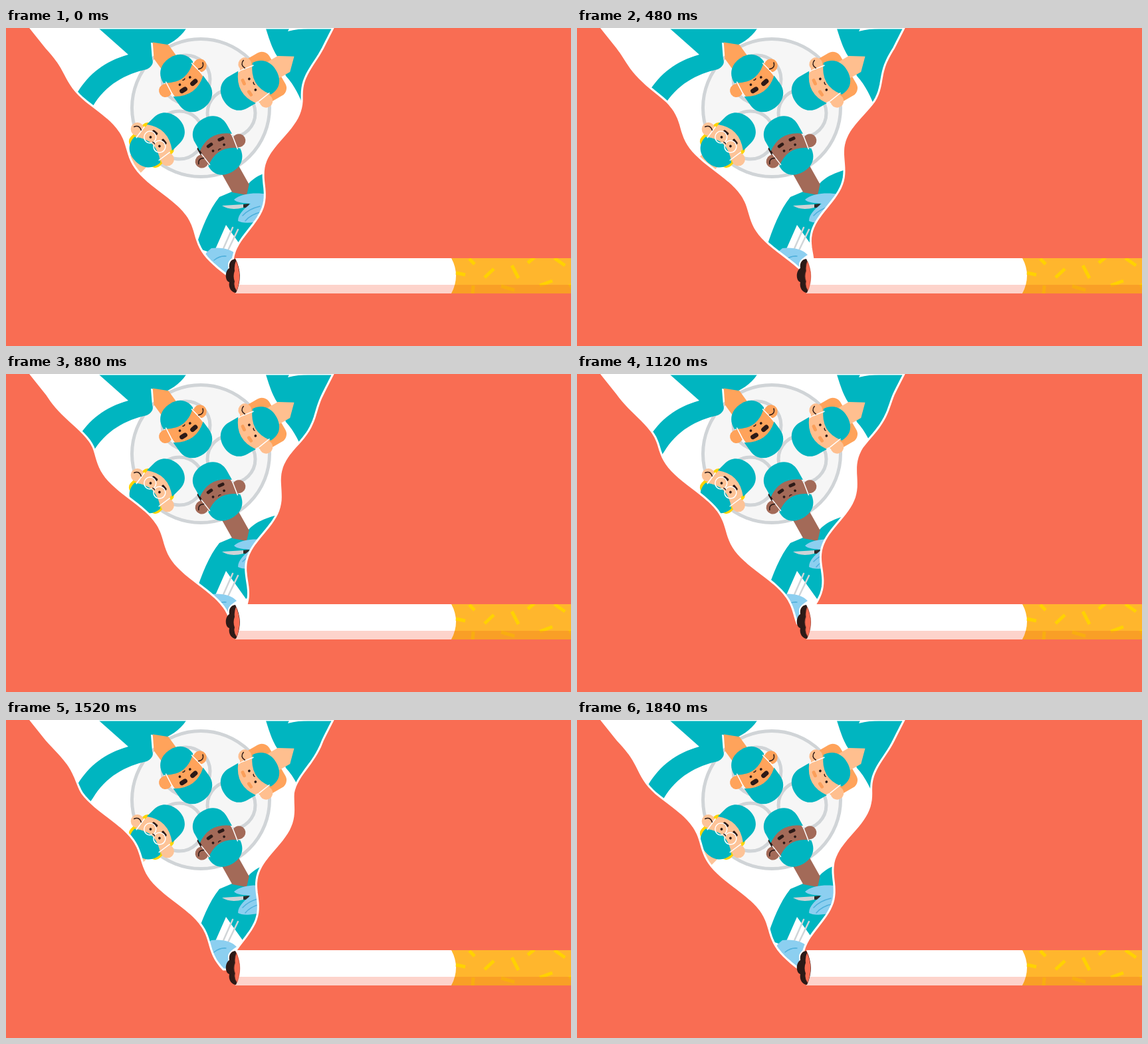
These frames come from a looping animation (850x478 px, 1.92 s). An HTML page:

```html
<!DOCTYPE html>
<html lang="en">
<head>
<meta charset="utf-8">
<title>Smoke and surgeons</title>
<style>
  html, body { margin: 0; width: 100%; height: 100%; overflow: hidden; background: #f96d53; }
  svg { display: block; width: 100%; height: 100%; }
  .teal { fill: #00b5c0; }
  .glove { fill: #8ccff0; }
  .line { fill: none; stroke-linecap: round; }
  .ember { animation: smoulder 480ms steps(3) infinite alternate; }
  @keyframes smoulder { to { transform: translateX(1px); } }
</style>
</head>
<body>
<svg viewBox="0 0 850 478">
  <defs>
    <clipPath id="smokeClip"><path class="smoke"/></clipPath>
    <clipPath id="cigClip"><path d="M345 346H850V399H345Q358 372 345 346Z"/></clipPath>
  </defs>
  <rect width="850" height="478" fill="#f96d53"/>

  <path class="smoke" fill="#fff"/>
  <g clip-path="url(#smokeClip)">
    <g fill="#f6f6f6" stroke="#d0d4d7" stroke-width="5">
      <circle cx="293" cy="120" r="103.5"/>
      <circle cx="271" cy="77" r="36"/>
      <circle cx="339" cy="128" r="36"/>
      <circle cx="261" cy="161" r="36"/>
    </g>
    <g class="teal">
      <path d="M140 1H271C263 13 253 20 241 26L218 22L220 47C223 53 218 59 212 62C180 69 150 85 131 117L115 140L90 120L108 96C125 69 148 50 184 40Z"/>
      <path d="M391 1H426L424 5Q440 1 455 1H500L480 120H448C443 105 434 86 421 72L412 48C402 36 397 20 391 1Z"/>
      <path d="M340 246L321 254C305 274 295 300 285 330L312 339L331 296L361 338L425 300V208C395 214 375 222 365 234Z"/>
    </g>
    <g id="heads"></g>

    <path d="M341 300L325 336M349 303L333 336" class="line" stroke="#d0d5d8" stroke-width="2.5"/>
    <path d="M325 267L358 265L357 270Q337 275 325 267Z" fill="#cfd3d6"/>
    <path d="M357 265L366 264L364 270L357 270Z" fill="#2d2a2a"/>
    <path class="glove" d="M343 258C355 248 375 247 395 250L398 286C375 294 355 294 349 290C349 280 358 272 368 264C358 263 348 263 343 258Z"/>
    <path class="glove" d="M309 331C325 329 340 333 347 341C338 347 334 350 334 356L336 386L294 350L302 337Z"/>
    <path class="line" stroke="#4fb0dc" stroke-width="1.5" d="M356 282Q365 272 382 268M360 290Q368 280 386 276M313 349Q322 342 331 343"/>
  </g>
  <path class="smoke" fill="none" stroke="#fff" stroke-width="3"/>

  <g clip-path="url(#cigClip)">
    <rect x="330" y="346" width="520" height="53" fill="#fff"/>
    <rect x="330" y="386" width="520" height="13" fill="#fdd3cb"/>
    <path d="M670 346H850V399H670Q684 372 670 346Z" fill="#ffb62d"/>
    <path fill="none" stroke="#ffd200" stroke-width="5" d="M697 347L705 355M677 368L691 371M720 375L734 362M761 357L771 376M785 353L795 345M825 346L841 357M745 388L765 394M803 387L822 380M703 387L702 400M848 385L852 392"/>
    <path d="M675 386H850V399H670Q674 393 675 386Z" fill="#f48a20" opacity=".5"/>
  </g>
  <path d="M345 347C337 348 335 355 336 361C329 365 329 380 336 382C334 391 340 398 346 398Q358 372 345 347Z" fill="#2d1a17"/>
  <path class="ember" d="M346 350Q356 372 347 395Q342 388 344 381Q341 373 344 365Q343 357 346 350Z" fill="#f96d53"/>
</svg>

<script>
const LOOP = 1920, STEP = 80;
const DARK = '#2d1a17';

// Each head is drawn upright around its face centre, cap on top, then turned.
const shortNeck = 'M-12 20V54L5 71L18 50V20Z';
const longNeck = 'M-15 20V64L2 78L13 66V20Z';
const heads = [
  { x: 266.5, y: 76, turn: 144, skin: '#ffa35b', brow: DARK, browWidth: 7, curl: -1, neck: shortNeck },
  { x: 374.5, y: 82.5, turn: -120, skin: '#ffbf8f', brow: '#fb9f5a', browWidth: 5, curl: 1, neck: shortNeck,
    hair: '<rect x="-37" y="-10" width="74" height="49" rx="13" fill="#ffa35b"/>' },
  { x: 221, y: 174, turn: 45, skin: '#fdc397', brow: DARK, browWidth: 4, curl: -1, neck: shortNeck,
    hair: '<rect x="-31" y="-20" width="62" height="46" rx="10" fill="#ffd400"/>', glasses: true },
  { x: 322, y: 184, turn: -29.4, skin: '#a36a58', brow: DARK, browWidth: 5, curl: -1, neck: longNeck,
    hair: `<rect x="-29" y="-20" width="15" height="14" rx="2" fill="${DARK}"/>` }
];

function drawHead(h) {
  const both = part => part(-1) + part(1);
  const ear = s => `<circle cx="${s * 32}" cy="1" r="10" fill="${h.skin}"/>
    <path class="line" stroke="#fff" stroke-width="1.5" d="M${s * 27} -9L${s * 24} 11"/>`;
  const eye = s => `<path class="line" stroke="${h.brow}" stroke-width="${h.browWidth}" d="M${s * 7} -14.5L${s * 12.5} -14"/>
    <circle cx="${s * 9.5}" cy="-4.5" r="1.9" fill="${DARK}"/>`;
  const lens = s => `<circle cx="${s * 10}" cy="-4" r="9" fill="none" stroke="#fff" stroke-width="1.5"/>`;
  return `<g transform="translate(${h.x} ${h.y}) rotate(${h.turn})">
    ${h.hair || ''}
    <path d="${h.neck}" fill="${h.skin}"/>
    <rect x="-26" y="-32" width="52" height="58" rx="14" fill="${h.skin}"/>
    <path class="teal" d="M-27 -14V-29C-27 -45 -14 -54 1 -54S28 -45 28 -29V-13Q0 -34 -27 -14Z"/>
    <path class="teal" d="M-27 12Q0 -10 28 12C27 28 16 37 0 37S-27 28 -27 12Z"/>
    ${both(ear)}${both(eye)}${h.glasses ? both(lens) : ''}
    <path class="line" stroke="${DARK}" stroke-width="1.3" d="M-2 -1.5Q0 -3 2 -1.5"/>
    <path class="line" stroke="${DARK}" stroke-width="1.5" d="M${h.curl * 38} 2Q${h.curl * 35} -6 ${h.curl * 27} -2"/>
  </g>`;
}
document.getElementById('heads').innerHTML = heads.map(drawHead).join('');

// A ripple climbs each edge once per loop; lag is in ms per pixel of height.
function ripple(y, t, lag, peak) {
  const size = 10.5 * Math.min(1, Math.max(0, (y - 30) / 80));
  return size * Math.cos(2 * Math.PI * (t + lag * y - peak) / LOOP);
}
const leftX = (y, t) => 37 + 0.8 * y + ripple(y, t, 15, 2250);
const rightX = (y, t) => 492 - 0.52 * y + 0.00033 * y * y + ripple(y, t, 13.8, 1800);

function smokePath(t) {
  const points = [];
  for (let y = 0; y <= 375; y += 5) points.push([leftX(y, t), y]);
  points.push([345, 375]);
  for (let y = 350; y >= 0; y -= 5) points.push([rightX(y, t), y]);
  return 'M' + points.map(([x, y]) => x.toFixed(1) + ' ' + y).join('L') + 'Z';
}

const smoke = document.querySelectorAll('.smoke');
const start = performance.now();
let shown = -1;

function draw(now) {
  const t = Math.floor(Math.max(0, now - start) % LOOP / STEP) * STEP;
  if (t !== shown) {
    shown = t;
    const d = smokePath(t);
    smoke.forEach(path => path.setAttribute('d', d));
  }
  requestAnimationFrame(draw);
}
draw(start);
</script>
</body>
</html>
```
